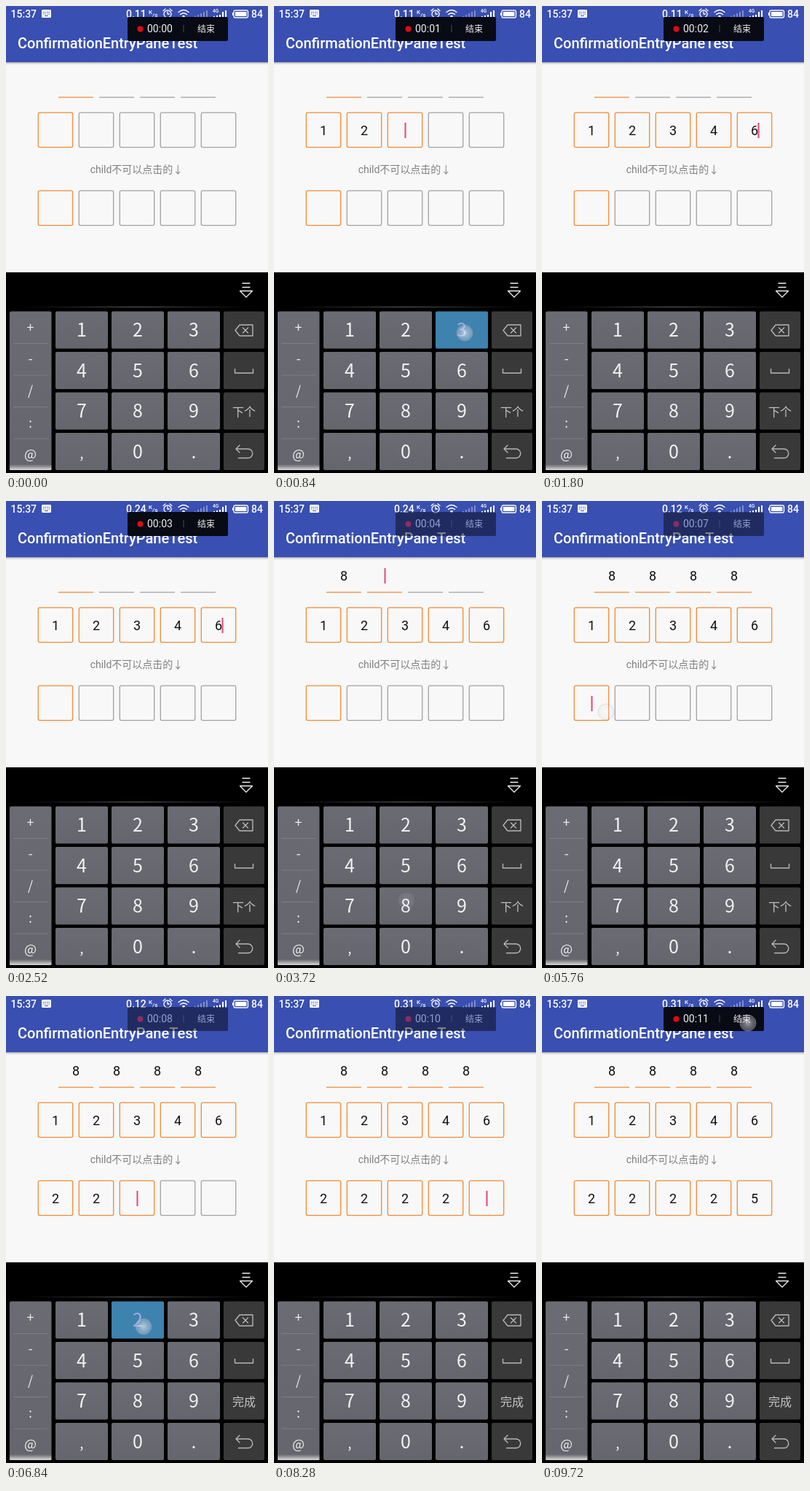
Write an HTML page that moves like this. It is 360 px wide and 640 px high and loops after 9.84 s.

```html
<!DOCTYPE html>
<html lang="zh">
<head>
<meta charset="utf-8">
<title>Code entry</title>
<style>
  html, body { margin: 0; width: 100%; height: 100%; overflow: hidden; background: #000; }
  svg { display: block; width: 100%; height: 100%; font-family: Roboto, "Noto Sans CJK SC", sans-serif; }
  .line { fill: none; stroke-linecap: round; stroke-linejoin: round; }
  .mid { text-anchor: middle; }
  .cjk { font-family: "Noto Sans CJK SC", "Noto Sans CJK", "Noto Sans", sans-serif; }
</style>
</head>
<body>
<svg id="stage" viewBox="0 0 360 640">
  <defs>
    <linearGradient id="shadow" x2="0" y2="1">
      <stop stop-color="#777" stop-opacity=".6"/><stop offset="1" stop-color="#bbb" stop-opacity="0"/>
    </linearGradient>
    <linearGradient id="keyFill" x2="0" y2="1">
      <stop stop-color="#6b6b73"/><stop offset="1" stop-color="#65656d"/>
    </linearGradient>
    <linearGradient id="rule">
      <stop stop-color="#555" stop-opacity="0"/><stop offset=".5" stop-color="#666"/><stop offset="1" stop-color="#555" stop-opacity="0"/>
    </linearGradient>
    <linearGradient id="fade" x2="0" y2="1">
      <stop stop-color="#ccc" stop-opacity="0"/><stop offset="1" stop-color="#ddd"/>
    </linearGradient>
    <radialGradient id="finger">
      <stop stop-color="#fff" stop-opacity=".6"/><stop offset=".5" stop-color="#e4e4ea" stop-opacity=".45"/>
      <stop offset="1" stop-color="#c8c8d4" stop-opacity=".35"/>
    </radialGradient>
  </defs>

  <rect width="360" height="365" fill="#f8f8f8"/>
  <rect width="360" height="77" fill="#394fb1"/>
  <rect y="77" width="360" height="4" fill="url(#shadow)"/>

  <g id="status" fill="#fff" font-size="14" font-weight="500">
    <text x="6.500" y="16">15:37</text>
    <rect x="49" y="5" width="13" height="11" rx="1.500"/>
    <path d="M51 8.500h9M51 11h9" stroke="#394fb1" stroke-dasharray="1.500 1"/>
    <path d="M53 13.500h5" stroke="#394fb1"/>
    <text id="speed" x="165" y="16"></text>
    <text x="196" y="11" font-size="8">K</text><text x="201" y="15" font-size="8">/s</text>
    <g class="line" stroke="#fff" stroke-width="1.300">
      <circle cx="222" cy="11" r="5"/><path d="M222 8v3h2.500M216 6.500l3-2.500M228 6.500l-3-2.500"/>
      <path d="M237 8.500q7-6 14 0M239.500 11.500q4.500-3.500 9 0"/>
      <rect x="313" y="6" width="19.500" height="10" rx="2"/>
    </g>
    <circle cx="244" cy="14.500" r="1.800"/>
    <rect x="315" y="8" width="15.500" height="6"/><rect x="311" y="9" width="2" height="4"/>
    <text x="284" y="9" font-size="6.500">4G</text>
    <text x="337" y="16">84</text>
  </g>
  <text x="16" y="58" font-size="20" font-weight="500" fill="#fff">ConfirmationEntryPaneTest</text>

  <g id="cells"></g>
  <text class="mid" x="179.500" y="228.500" font-size="14" fill="#808080">child不可以点击的↓</text>
  <rect id="caret" width="2" height="21" fill="#e8437b"/>

  <rect y="365" width="360" height="275"/>
  <path class="line" d="M325 380h10M325 385.500h10M321.500 390.500h17l-8.500 8.500z" stroke="#eee" stroke-width="1.300"/>
  <rect x="20" y="412" width="320" height="1" fill="url(#rule)"/>
  <g id="keys"></g>
  <g class="line" stroke="#b6b6b6" stroke-width="1.400">
    <path d="M315 444.500l6-7.500h18v15h-18zM325.500 441l7 7M332.500 441l-7 7"/>
    <path d="M314.500 497.500v5.500h25v-5.500"/>
    <path d="M321 602l-5 5 5 5M316 607h16.500a6 6 0 0 1 0 12.500h-13"/>
  </g>

  <g id="recorder">
    <rect x="167" y="15" width="138" height="33" rx="2" fill="#080a14"/>
    <circle cx="184.500" cy="31.500" r="4" fill="#dc0c16"/>
    <text id="clock" x="194" y="36" font-size="14" fill="#eee"></text>
    <path d="M244 26v10" stroke="#484a55"/>
    <text class="mid cjk" x="275" y="35.500" font-size="12" fill="#eee">结束</text>
  </g>
  <circle id="touch" r="11" fill="url(#finger)" stroke="#9494ac" stroke-opacity=".5"/>
</svg>

<script>
const LOOP = 9840, BLINK = 417, FADE = 210;
const ORANGE = '#f08a36', GREY = '#a2a2a2';
const $ = id => document.getElementById(id);

function add(parent, tag, attrs, text) {
  const node = document.createElementNS('http://www.w3.org/2000/svg', tag);
  for (const name in attrs) node.setAttribute(name, attrs[name]);
  if (text) node.textContent = text;
  return parent.appendChild(node);
}
const set = (node, name, value) => node.setAttribute(name, value);

// Signal strength bars
[[259, .35], [285, 1]].forEach(([left, opacity], n) => {
  for (let i = 0; i < 5; i++) {
    const h = n && i < 3 ? 2 + i : 2 + i * 2;
    add($('status'), 'rect', { x: left + i * 4, y: 16 - h, width: 2, height: h, opacity });
  }
});

// Code rows; drift is the finger's offset from a key's centre
const rows = [
  { x: 72, y: 78, count: 4, drift: [1, -7], underline: true },
  { x: 44, y: 146, count: 5, drift: [4, 4] },
  { x: 44, y: 253, count: 5, drift: [8, 9] }
];
for (const row of rows) {
  row.cells = Array.from({ length: row.count }, (_, i) => {
    const x = row.x + i * 56, y = row.y;
    const border = row.underline
      ? add($('cells'), 'path', { d: `M${x} 125.2h48`, fill: 'none', 'stroke-width': 1.3 })
      : add($('cells'), 'rect', { x: x + .3, y: y + .2, width: 47.4, height: 47.4, rx: 2, fill: 'none', 'stroke-width': 1.3 });
    const label = add($('cells'), 'text', { x: x + 24, y: y + 30.5, class: 'mid', 'font-size': 18, fill: '#111' });
    return { border, label };
  });
}

// Keypad
const colX = [68, 145, 222, 299], rowY = [418.5, 474, 529.5, 585];
const keys = {};
add($('keys'), 'rect', { x: 5, y: 418.5, width: 57.5, height: 217, rx: 2, fill: 'url(#keyFill)' });
[...'+-/:@'].forEach((sign, i) => {
  add($('keys'), 'text', { x: 33.5, y: 446.5 + i * 43.7, class: 'mid cjk', 'font-size': 18, fill: '#eee' }, sign);
  if (i) add($('keys'), 'rect', { x: 10, y: 418.5 + i * 43.5, width: 47, height: 1, fill: '#7d7d85' });
});
add($('keys'), 'rect', { x: 5, y: 628, width: 57.5, height: 8, rx: 1, fill: 'url(#fade)' });
[...'123456789,0.'].forEach((char, i) => {
  const x = colX[i % 3], y = rowY[i / 3 | 0];
  const size = char === ',' ? 19 : 25;
  const face = add($('keys'), 'rect', { x, y, width: 72, height: 51, rx: 2, fill: 'url(#keyFill)' });
  const label = add($('keys'), 'text', { x: x + 36, y: y + 34.5, class: 'mid cjk', 'font-size': size, fill: '#f2f2f2' }, char);
  keys[char] = { face, label, x: x + 36, y: y + 25.5 };
});
rowY.forEach(y => add($('keys'), 'rect', { x: 299, y, width: 56, height: 51, rx: 2, fill: '#393939' }));
const action = add($('keys'), 'text', { x: 327, y: 561.5, class: 'mid cjk', 'font-size': 16, fill: '#c4c4c4' });

// Finger actions: key strokes and plain taps
const stroke = (row, key, down, up) => ({
  row, key, down, up, x: keys[key].x + rows[row].drift[0], y: keys[key].y + rows[row].drift[1]
});
const tap = (row, x, y, down, up) => ({ row, x, y, down, up });
const actions = [
  stroke(1, '1', 110, 240), stroke(1, '2', 420, 550), stroke(1, '3', 730, 860),
  stroke(1, '4', 1040, 1170), stroke(1, '6', 1370, 1500),
  tap(0, 98, 104, 2740, 2900),
  stroke(0, '8', 3450, 3570), stroke(0, '8', 3820, 3950),
  stroke(0, '8', 4140, 4270), stroke(0, '8', 4470, 4600),
  tap(2, 88, 289, 5270, 5650),
  stroke(2, '2', 6020, 6150), stroke(2, '2', 6370, 6500),
  stroke(2, '2', 6740, 6870), stroke(2, '2', 7010, 7140),
  stroke(2, '5', 8870, 9040),
  tap(null, 283, 37, 9580, LOOP)
];
const speeds = [[0, '0.11'], [2280, '0.24'], [4800, '0.12'], [7320, '0.31']];
const clamp = v => Math.max(0, Math.min(1, v));

function drawRows(t) {
  const done = actions.filter(a => a.row !== null && a.up <= t);
  const last = done[done.length - 1];
  const focus = last ? last.row : 1;
  const since = t - (last ? last.up : -BLINK);
  rows.forEach((row, r) => {
    const typed = done.filter(a => a.row === r && a.key).map(a => a.key);
    row.cells.forEach(({ border, label }, i) => {
      set(border, 'stroke', i <= typed.length ? ORANGE : GREY);
      label.textContent = typed[i] || '';
    });
    if (r === focus) {
      const full = typed.length === row.count;
      const cell = Math.min(typed.length, row.count - 1);
      set($('caret'), 'x', row.x + cell * 56 + (full ? 28.5 : 23.5));
      set($('caret'), 'y', row.y + 14);
      set($('caret'), 'opacity', since % (2 * BLINK) < BLINK ? 1 : 0);
    }
  });
}

function drawFinger(t) {
  const current = actions.filter(a => a.down <= t).pop();
  for (const char in keys) {
    const pressed = current && current.key === char && t < current.up;
    set(keys[char].face, 'fill', pressed ? '#3e82ae' : 'url(#keyFill)');
    set(keys[char].label, 'fill', pressed ? '#9fabea' : '#f2f2f2');
  }
  set($('touch'), 'opacity', current ? clamp(1 - (t - current.up) / FADE) : 0);
  if (current) {
    set($('touch'), 'cx', current.x);
    set($('touch'), 'cy', current.y);
  }
}

function draw(now) {
  const t = now % LOOP;
  drawRows(t);
  drawFinger(t);
  $('speed').textContent = speeds.filter(s => s[0] <= t).pop()[1];
  $('clock').textContent = '00:' + String(Math.floor(t * .0012 + .1)).padStart(2, '0');
  action.textContent = t < 5880 ? '下个' : '完成';
  set($('recorder'), 'opacity', t >= 9580 ? 1 : 1 - .5 * clamp((t - 2760) / 300));
}

const start = performance.now();
(function tick() {
  draw(performance.now() - start);
  requestAnimationFrame(tick);
})();
</script>
</body>
</html>
```
